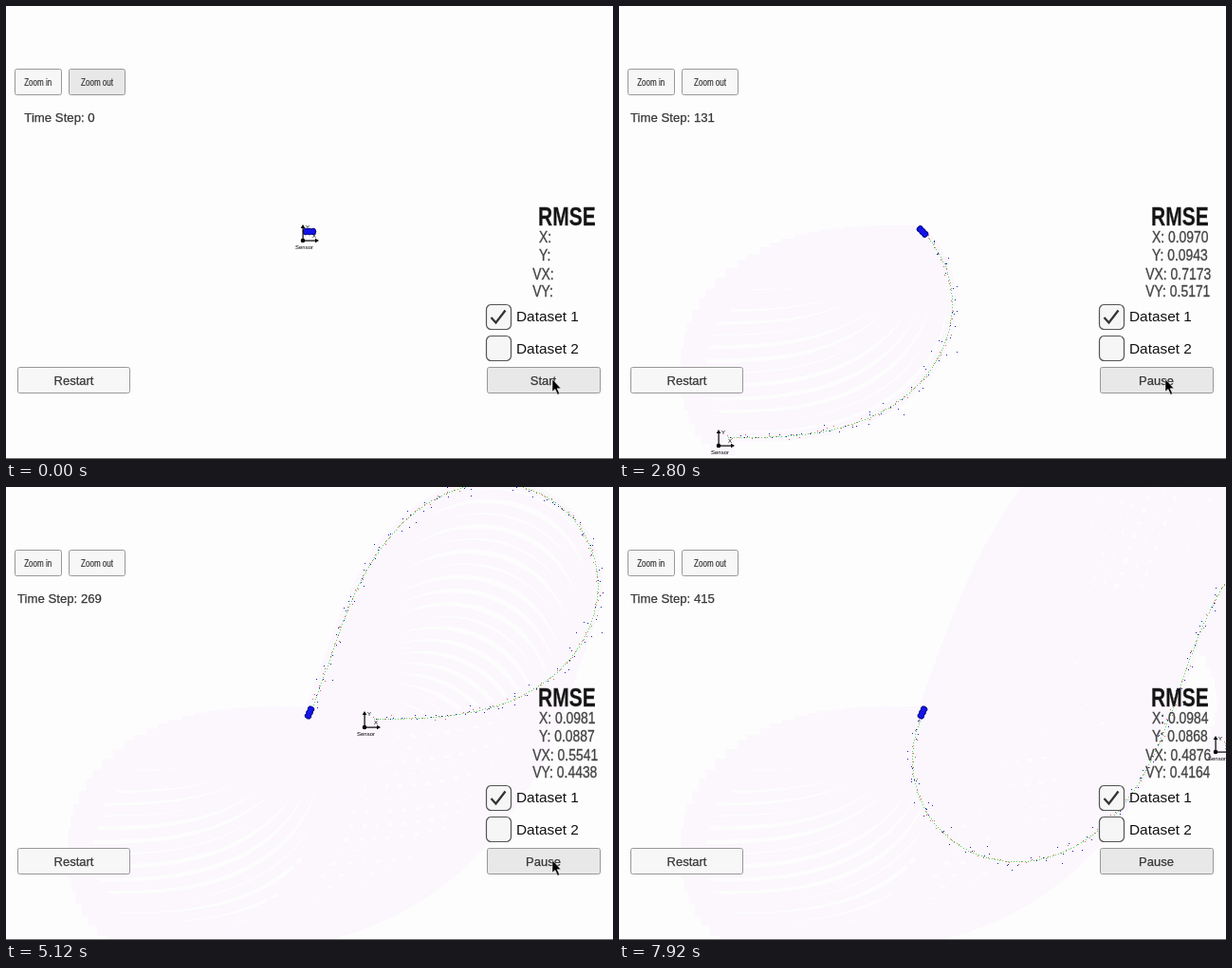
An HTML page with a canvas that plays this animation: 640 px wide and 477 px high, repeating every 8000 ms.

```html
<!DOCTYPE html>
<html lang="en">
<head>
<meta charset="utf-8">
<title>Tracking simulator</title>
<style>
  html, body { margin: 0; width: 100%; height: 100%; overflow: hidden; background: #fdfdfd; }
  canvas, svg { position: absolute; left: 0; top: 0; width: 640px; height: 477px; }
  text { font: 13px "Liberation Sans", Arial, sans-serif; fill: #363636; stroke: #363636; stroke-width: .25; }
  .mid { text-anchor: middle; }
  .zoom { font-size: 11.5px; }
  .counter { font-size: 13.2px; }
  .option { font-size: 15.4px; fill: #111; stroke: none; }
  .value { font-size: 16px; fill: #444; stroke: #444; stroke-width: .35; }
  .heading { font-size: 28px; font-weight: bold; fill: #151515; }
  .button { fill: #f7f7f7; stroke: #989898; }
  .hover { fill: #e8e8e8; }
  .box { fill: #f6f6f6; stroke: #555; stroke-width: 1.2; }
</style>
</head>
<body>
<canvas id="world" width="640" height="477"></canvas>
<svg viewBox="0 0 640 477">
  <rect class="button" x="9.5" y="66.5" width="49" height="27" rx="2"/>
  <rect class="button" id="zoomOut" x="66.5" y="66.5" width="59" height="27" rx="2"/>
  <text class="mid zoom" transform="translate(33.7 84) scale(.7 1)">Zoom in</text>
  <text class="mid zoom" transform="translate(96 84) scale(.7 1)">Zoom out</text>
  <text class="mid counter" id="counter" x="56.5" y="122"></text>

  <text class="heading" transform="translate(561 231) scale(.75 1)">RMSE</text>
  <g id="values">
    <text class="value" transform="translate(562 249) scale(.87 1)"></text>
    <text class="value" transform="translate(562 268) scale(.87 1)"></text>
    <text class="value" transform="translate(555.3 288) scale(.87 1)"></text>
    <text class="value" transform="translate(555.3 306) scale(.87 1)"></text>
  </g>

  <rect class="box" x="506.5" y="314.5" width="26" height="26" rx="5"/>
  <rect class="box" x="506.5" y="347.5" width="26" height="26" rx="5"/>
  <path d="M511.5 328l5 5.5 10-13" fill="none" stroke="#333" stroke-width="2.3"/>
  <text class="option" x="538" y="332">Dataset 1</text>
  <text class="option" x="538" y="366">Dataset 2</text>

  <rect class="button" x="12.5" y="380.5" width="118" height="27" rx="2"/>
  <rect class="button hover" x="507.5" y="380.5" width="119" height="27" rx="2"/>
  <text class="mid" x="71.5" y="399">Restart</text>
  <text class="mid" id="run" x="566.5" y="399">Start</text>
  <path id="cursor" d="M576 393v13l3-2.6 2.6 5.8 2-.9-2.5-5.6h4z" fill="#000" stroke="#fff" stroke-width=".5"/>
  <rect y="476" width="640" height="1" fill="#707070"/>
</svg>
<script>
const LOOP = 8000, TICK = 80, START = 480, CURSOR_GONE = 5280;
const CAR = { x: 320, y: 238 };
const STEPS = 420, LAP = 500;

// the simulator does not run evenly: [time, step]
const pace = [[START, 0], [1440, 51], [2800, 131], [4560, 238], [5760, 305], [6720, 349], [7920, 415]];

// each error settles as sqrt(floor + excess / step)
const errors = {
  X: { floor: .0098, excess: -.05 },
  Y: { floor: .0069, excess: .26 },
  VX: { floor: .11, excess: 53 },
  VY: { floor: .13, excess: 18 }
};

const $ = id => document.getElementById(id);
const ctx = $('world').getContext('2d');

// figure of eight relative to the sensor: the heading swings once per lap
function buildPath() {
  const path = [{ x: 7, y: -9, heading: 0 }];
  for (let step = 1; step <= STEPS; step++) {
    const phase = 2 * Math.PI * (step - .5) / LAP;
    const heading = 2.19 * (1 - Math.cos(phase));
    const speed = 3.02 + .12 * Math.cos(2 * phase);
    const { x, y } = path[step - 1];
    path.push({ x: x + speed * Math.cos(heading), y: y - speed * Math.sin(heading), heading });
  }
  return path;
}

let seed = 11;
function random() {
  seed = (seed * 16807) % 2147483647;
  return seed / 2147483647;
}
const gauss = () => Math.sqrt(-2 * Math.log(random())) * Math.cos(2 * Math.PI * random());

const path = buildPath();

// lidar has plain position noise, radar has range and bearing noise
const readings = path.map((p, step) => {
  if (step % 2) return { x: p.x + 1.5 * gauss(), y: p.y + 1.5 * gauss(), color: '#e06060' };
  const range = Math.hypot(p.x, p.y) + 3.2 * gauss();
  const bearing = Math.atan2(p.y, p.x) + .026 * gauss();
  return { x: range * Math.cos(bearing), y: range * Math.sin(bearing), color: '#2020b0' };
});

function stepAt(time) {
  if (time <= START) return 0;
  const i = pace.findIndex(([t]) => t >= time);
  const [t0, s0] = pace[i - 1], [t1, s1] = pace[i];
  return Math.round(s0 + (s1 - s0) * (time - t0) / (t1 - t0));
}

function errorText(name, step) {
  const { floor, excess } = errors[name];
  return Math.sqrt(floor + excess / Math.max(step, 6)).toFixed(4);
}

const sensorAt = step => ({ x: CAR.x - path[step].x, y: CAR.y - path[step].y });

// pale afterglow of every earlier position of trail and sensor
function drawGlow(time) {
  ctx.strokeStyle = ctx.fillStyle = '#fbf7fd';
  ctx.lineWidth = 10;
  ctx.lineJoin = ctx.lineCap = 'round';
  for (let t = START + TICK; t <= time; t += TICK) {
    const step = stepAt(t), o = sensorAt(step);
    ctx.fillRect(o.x - 9, o.y - 16, 26, 26);
    ctx.beginPath();
    for (let i = 0; i <= step; i++) ctx.lineTo(o.x + path[i].x, o.y + path[i].y);
    ctx.stroke();
  }
}

function dot(o, p, color) {
  ctx.fillStyle = color;
  ctx.fillRect(Math.round(o.x + p.x), Math.round(o.y + p.y), 1, 1);
}

function drawTrail(o, step) {
  for (let i = 1; i <= step; i++) dot(o, readings[i], readings[i].color);
  for (let i = 1; i <= step; i++) dot(o, path[i], '#58d858');
}

function drawSensor(o) {
  ctx.save();
  ctx.translate(Math.round(o.x), Math.round(o.y));
  ctx.fillStyle = '#000';
  ctx.fillRect(-.5, -15, 1.2, 15);
  ctx.fillRect(0, -.5, 15, 1.2);
  ctx.beginPath();
  ctx.arc(0, 0, 2.3, 0, 7);
  ctx.moveTo(0, -17); ctx.lineTo(-2.3, -13); ctx.lineTo(2.3, -13);
  ctx.moveTo(17, 0); ctx.lineTo(13, -2.3); ctx.lineTo(13, 2.3);
  ctx.fill();
  ctx.font = '6px "Liberation Sans", sans-serif';
  ctx.textAlign = 'center';
  ctx.fillText('Y', 5, -12);
  ctx.fillText('X', 12, -3);
  ctx.fillText('Sensor', 1.5, 9);
  ctx.restore();
}

function drawCar(step) {
  ctx.save();
  ctx.translate(CAR.x, CAR.y - .5);
  ctx.rotate(-path[step].heading);
  ctx.fillStyle = '#0c0cd8';
  ctx.strokeStyle = '#000060';
  ctx.lineWidth = .7;
  for (const x of [-4, 0, 4]) {
    ctx.beginPath();
    ctx.ellipse(x, 0, 2.8, 3.5, 0, 0, 7);
    ctx.fill();
    ctx.stroke();
  }
  ctx.fillStyle = '#1414e8';
  ctx.fillRect(-5.5, -2.2, 11, 4.4);
  ctx.restore();
}

function render(time) {
  const step = stepAt(time), running = time >= START, o = sensorAt(step);
  ctx.fillStyle = '#fdfdfd';
  ctx.fillRect(0, 0, 640, 477);
  drawGlow(time);
  drawTrail(o, step);
  drawCar(step);
  drawSensor(o);

  $('counter').textContent = 'Time Step: ' + step;
  $('run').textContent = running ? 'Pause' : 'Start';
  $('zoomOut').classList.toggle('hover', !running);
  $('cursor').style.display = time < CURSOR_GONE ? '' : 'none';
  Object.keys(errors).forEach((name, i) => {
    $('values').children[i].textContent = name + ':' + (running ? ' ' + errorText(name, step) : '');
  });
}

const begin = performance.now();
let shown = -1;
function frame() {
  const time = Math.floor(((performance.now() - begin) % LOOP) / TICK) * TICK;
  if (time !== shown) render(shown = time);
  requestAnimationFrame(frame);
}
frame();
</script>
</body>
</html>
```
